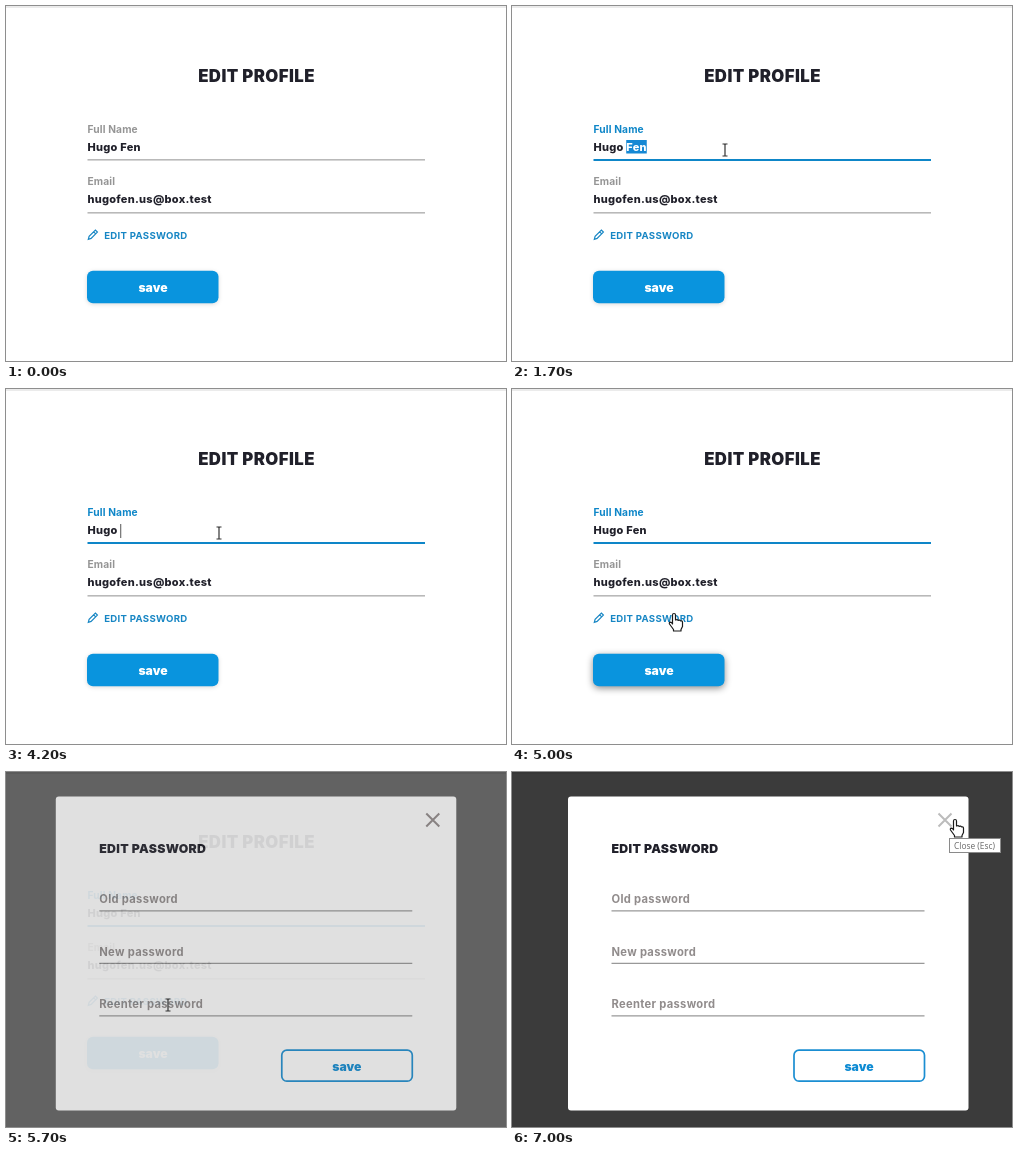
An HTML page that plays this animation: 500x355 px, repeating every 7.1 s.

```html
<!DOCTYPE html>
<html lang="en">
<head>
<meta charset="utf-8">
<title>Edit profile</title>
<style>
  html, body { margin: 0; width: 100%; height: 100%; overflow: hidden; background: #fff; }
  svg { display: block; width: 500px; height: 355px; }
  text { font: 800 11px Inter, "Open Sans", sans-serif; letter-spacing: .25px; fill: #20202a; white-space: pre; }
  text.title { font-size: 16.8px; font-weight: 900; letter-spacing: .4px; text-anchor: middle; }
  text.label { font-size: 10.2px; font-weight: 700; letter-spacing: .15px; fill: #959595; }
  text.link { font-size: 9.6px; font-weight: 700; letter-spacing: .3px; fill: #1786c4; }
  text.error { font-size: 8.8px; font-weight: 400; letter-spacing: .2px; fill: #b9665f; }
  text.heading { font-size: 12.3px; font-weight: 900; letter-spacing: .3px; }
  text.field { font-size: 11.2px; font-weight: 700; letter-spacing: .3px; fill: #918c8c; }
  text.button { font-size: 12.2px; font-weight: 900; letter-spacing: 0; text-anchor: middle; fill: #fff; }
  text.tip { font: 400 8.4px "Open Sans", sans-serif; letter-spacing: 0; fill: #686868; }
  .pointer { fill: #fff; stroke: #1a1a1a; stroke-width: 1.2; stroke-linejoin: round; }
</style>
</head>
<body>
<svg viewBox="0 0 500 355">
  <rect width="500" height="355" fill="#fff"/>
  <rect width="500" height="2" fill="#ebebeb"/>
  <text class="title" x="250.5" y="76">EDIT PROFILE</text>

  <text class="label" id="label" x="81.5" y="126.5">Full Name</text>
  <rect id="mark" y="134" height="13.5" fill="#1588d4"/>
  <text id="name" x="81.5" y="145"><tspan id="plain"></tspan><tspan id="picked" fill="#fff"></tspan></text>
  <rect id="caret" y="135" width="1" height="14" fill="#555"/>
  <rect id="line" x="81.5" y="153" width="337.5"/>
  <text class="error" id="error" x="81.5" y="169">Please enter your full name</text>

  <g id="below">
    <text class="label" x="81.5" y="179">Email</text>
    <text x="81.5" y="197">hugofen.us@box.test</text>
    <rect x="81.5" y="206" width="337.5" height="1.6" fill="#b9b9b9"/>
    <path d="M82.3 233.3l.8-2.9 6.3-6.3 2 2-6.3 6.3zM87.7 225.8l2 2" fill="none" stroke="#1786c4" stroke-width="1.2"/>
    <text class="link" x="98.2" y="233">EDIT PASSWORD</text>
    <rect id="save" x="81" y="264.7" width="131.5" height="32.5" rx="6" fill="#0994de"/>
    <text class="button" x="147" y="286">save</text>
  </g>

  <rect id="shade" width="500" height="355" fill="#0b0b0b"/>
  <g id="modal">
    <rect x="56" y="24.5" width="400.5" height="314" rx="3" fill="#fff"/>
    <path id="close" d="M426.5 41.5l13 13m0-13l-13 13" stroke-width="2"/>
    <text class="heading" x="99.5" y="80.5">EDIT PASSWORD</text>
    <text class="field" x="99.5" y="131">Old password</text>
    <text class="field" x="99.5" y="183.5">New password</text>
    <text class="field" x="99.5" y="236">Reenter password</text>
    <path d="M99.5 138.8h313m-313 52.5h313m-313 52.5h313" stroke="#999" stroke-width="1.2"/>
    <rect x="282" y="278.2" width="130.5" height="31" rx="5" fill="#fff" stroke="#1a8ed2" stroke-width="1.7"/>
    <text class="button" x="347" y="298.5" style="fill:#0e8bd3">save</text>
  </g>

  <g id="tip">
    <rect x="437.5" y="66.5" width="51" height="14" fill="#fff" stroke="#8a8a8a"/>
    <text class="tip" x="442" y="76.5">Close (Esc)</text>
  </g>

  <g id="cursor">
    <path class="pointer" d="M0 0v12l2.8-2.6 2 4.4 1.9-.8-2-4.3H8.4z"/>
    <path d="M-2.5-6h2l.5.6.5-.6h2M-2.5 6h2l.5-.6.5.6h2M0-5.4V5.4" fill="none" stroke="#333" stroke-width="1.2"/>
    <path class="pointer" d="M-1.5 1Q-1.5-.5 0-.5T1.5 1v5q2-1 2.5.4 2-.8 2.5.5 2-.5 2 1.3v4.3l-1.5 3V17H-.5v-1.5L-4.5 10q-.6-1.6.8-1.9 1.2 0 2.2 1.8z"/>
  </g>
</svg>
<script>
const LOOP = 7100, NAME = "Hugo Fen", LEFT = 81.5;
const GREY = [149, 149, 149], RULE = [185, 185, 185], BLUE = [14, 134, 200], RED = [207, 32, 28];
const ARROW = 0, BEAM = 1, HAND = 2;

// Pointer stops: time, x, y
const path = [
  [900, 262, 332], [1250, 213, 144], [4550, 213, 144], [4760, 185, 272], [4980, 162, 225],
  [5300, 162, 225], [5500, 162, 233], [6200, 162, 233], [6850, 443, 48]
];
const shapes = [
  [900, ARROW], [1150, BEAM], [4570, ARROW], [4700, HAND], [4820, ARROW],
  [4900, HAND], [5620, BEAM], [6250, ARROW], [6740, HAND]
];

const $ = id => document.getElementById(id);
const set = (id, attrs) => { for (const k in attrs) $(id).setAttribute(k, attrs[k]); };
const show = (el, on) => { el.style.display = on ? "" : "none"; };
const mix = (a, b, p) => a.map((v, i) => v + (b[i] - v) * p);
const rgb = c => `rgb(${c.map(Math.round)})`;

// The CSS "ease" curve, cubic-bezier(.25, .1, .25, 1)
function ease(x) {
  if (x <= 0 || x >= 1) return x <= 0 ? 0 : 1;
  const curve = (s, a, b) => 3 * s * (1 - s) ** 2 * a + 3 * s * s * (1 - s) * b + s ** 3;
  let lo = 0, hi = 1;
  for (let i = 0; i < 20; i++) {
    const mid = (lo + hi) / 2;
    if (curve(mid, .25, .25) < x) lo = mid; else hi = mid;
  }
  return curve(lo, .1, 1);
}
const ramp = (t, start, length) => ease((t - start) / length);

function drawName(t) {
  let text = NAME, from = NAME.length;
  if (t >= 1500 && t < 1850) from = NAME.indexOf(" ") + 1;
  else if (t >= 1850 && t < 2100) from = 0;
  else if (t >= 2100 && t < 4600) text = NAME.slice(0, Math.max(0, Math.floor((t - 3700) / 100)));
  $("plain").textContent = text.slice(0, from);
  $("picked").textContent = text.slice(from);

  const start = LEFT + $("plain").getComputedTextLength();
  const width = from < text.length ? $("picked").getComputedTextLength() : 0;
  set("mark", { x: start, width });
  set("caret", { x: start });
  const blink = Math.floor((t - 2140) / 480) % 2 === 0;
  const typing = t >= 3800 && t < 4900;
  show($("caret"), !width && t >= 1300 && t < 4900 && (typing || blink));
}

function drawForm(t) {
  const focus = ramp(t, 1250, 200);
  const wrong = ramp(t, 2700, 300) - ramp(t, 3800, 300);
  $("label").style.fill = rgb(mix(mix(GREY, BLUE, focus), RED, wrong));
  set("line", { fill: rgb(mix(mix(RULE, BLUE, focus), RED, wrong)), height: 1.6 + .4 * focus });
  set("error", { opacity: wrong });
  set("below", { transform: `translate(0 ${16 * wrong})` });

  const hover = ramp(t, 4690, 200) - ramp(t, 4930, 400);
  const alpha = .15 + .4 * hover;
  $("save").style.filter = `drop-shadow(0 ${1 + 2.5 * hover}px ${2 + 2 * hover}px rgba(0,0,0,${alpha}))`;
}

function drawModal(t) {
  const open = ramp(t, 5550, 300);
  set("shade", { opacity: .8 * open });
  set("modal", { opacity: open, transform: `translate(${-32 * (1 - open)} 0)` });
  set("close", { stroke: rgb(mix([146, 138, 138], [188, 188, 188], ramp(t, 6800, 100))) });
  set("tip", { opacity: ramp(t, 6850, 140) });
}

function drawCursor(t) {
  show($("cursor"), t >= path[0][0]);
  const next = path.findIndex(p => p[0] > t);
  let [, x, y] = path.at(-1);
  if (next > 0) {
    const [t0, ...a] = path[next - 1], [t1, ...b] = path[next];
    [x, y] = mix(a, b, ramp(t, t0, t1 - t0));
  }
  set("cursor", { transform: `translate(${x} ${y})` });
  const shape = (shapes.findLast(s => s[0] <= t) || shapes[0])[1];
  [...$("cursor").children].forEach((el, i) => show(el, i === shape));
}

function frame() {
  const t = performance.now() % LOOP;
  drawName(t);
  drawForm(t);
  drawModal(t);
  drawCursor(t);
  requestAnimationFrame(frame);
}
frame();
</script>
</body>
</html>
```
